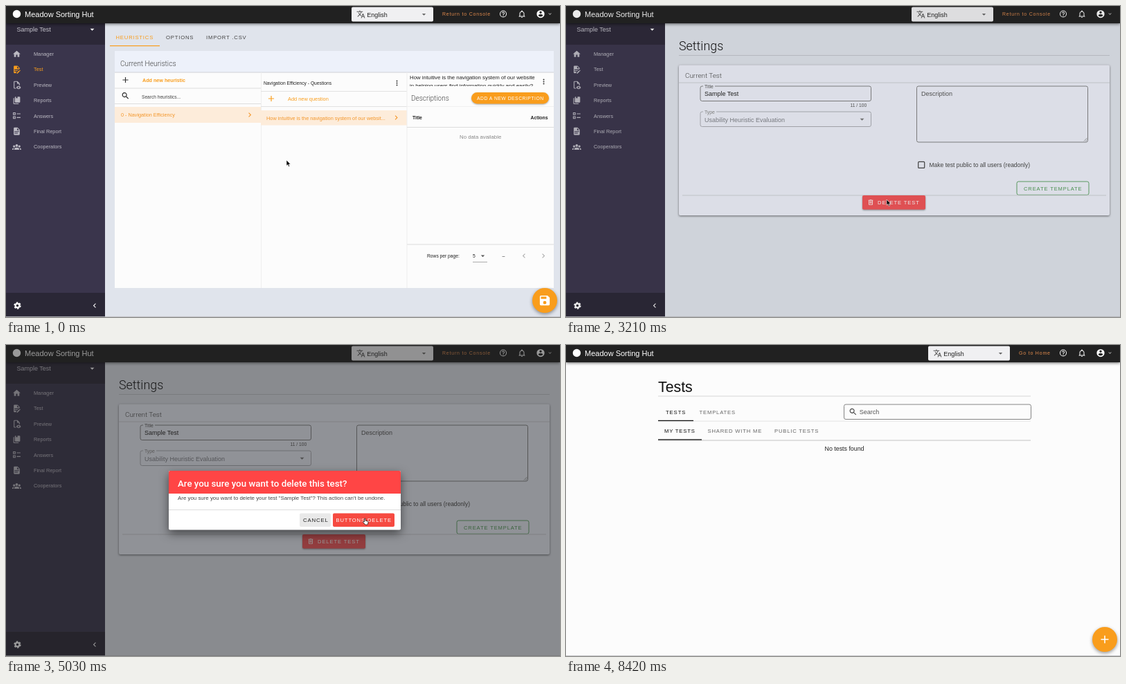
Recreate the animation shown at these times as an HTML page. Size 800 by 450 pixels, loop 8.45 s.

```html
<!DOCTYPE html>
<html lang="en">
<head>
<meta charset="utf-8">
<title>Deleting a test</title>
<style>
html, body { margin: 0; width: 100%; height: 100%; overflow: hidden; }
svg { display: block; width: 100vw; height: 100vh; font-family: "Liberation Sans", Arial, sans-serif; }
text { white-space: pre; }
.rb { font-family: Roboto, sans-serif; }
.card { filter: drop-shadow(0 1px 1.5px #0008); }
.fab { filter: drop-shadow(0 2px 2.5px #0006); }
</style>
</head>
<body>
<svg id="stage" viewBox="0 0 800 450"></svg>
<script>
const ORANGE = '#f99d1c', INK = '#222', LINE = '#cfd2d8';

const icons = {
  home: 'M10 20v-6h4v6h5v-8h3L12 3 2 12h3v8z',
  edit: 'M6 2C4.9 2 4 2.9 4 4V20A2 2 0 0 0 6 22H10V20L12 18H6V16H14L16 14H6V12H18L20 10V8L14 2zM13 3.5L18.5 9H13zM20.2 13L18.7 14.2 20.8 16.3 22 14.8zM18.1 14.8L12 20.9V23H14.1L20.2 16.9z',
  eye: 'M17 18a1 1 0 1 0 0 2 1 1 0 1 0 0-2M17 15C14.3 15 12 16.7 11 19c2 5.3 10 5.3 12 0-1-2.300-3.300-4-6-4M17 16.500a2.500 2.500 0 1 0 0 5 2.500 2.500 0 1 0 0-5M9.300 20H6V4H13V9H18V13L20 13.600V8L14 2H6A2 2 0 0 0 4 4V20A2 2 0 0 0 6 22H10.500z',
  books: 'M19 18H9a2 2 0 0 1-2-2V4a2 2 0 0 1 2-2h1v5l2-1.500L14 7V2h5a2 2 0 0 1 2 2v12a2 2 0 0 1-2 2M17 20v2H5a2 2 0 0 1-2-2V6h2v14z',
  list: 'M2 3h7v7H2zm2 2v3h3V5zM12 5.500h10v2H12zM2 13h7v7H2zm2 2v3h3v-3zM12 15.500h10v2H12z',
  doc: 'M13 9h5.500L13 3.500zM6 2h8l6 6v12a2 2 0 0 1-2 2H6a2 2 0 0 1-2-2V4a2 2 0 0 1 2-2M15 18v-2H6v2zM18 14v-2H6v2z',
  group: 'M12 5.500a3.500 3.500 0 1 1 0 7 3.500 3.500 0 1 1 0-7M5 8a3 3 0 1 0 0 6 3 3 0 1 0 0-6M19 8a3 3 0 1 0 0 6 3 3 0 1 0 0-6M5.500 20v-2c0-5 13-5 13 0v2zM0 20c0-3 1-4 4.500-4.400q-1 1.500-1 4.400zM24 20c0-3-1-4-4.500-4.400q1 1.500 1 4.400z',
  lang: 'M12.900 15L10.300 12.600C12 10.600 13.300 8.400 14 6H17V4H10V2H8V4H1V6H12.200Q11.200 9 9 11.400 7.600 9.800 6.700 8H4.700Q5.800 10.500 7.700 12.600L2.600 17.600 4 19l5-5 3.100 3.100zM18.500 10h-2L12 22h2l1.100-3h4.800L21 22h2zM15.900 17l1.600-4.300L19.100 17z',
  help: 'M11 18h2v-2h-2zM12 2a10 10 0 1 0 0 20 10 10 0 1 0 0-20M12 4a8 8 0 1 1 0 16 8 8 0 1 1 0-16M12 6a4 4 0 0 0-4 4h2a2 2 0 1 1 4 0c0 2-3 1.800-3 5h2c0-2.300 3-2.500 3-5a4 4 0 0 0-4-4',
  bell: 'M10 21h4a2 2 0 0 1-4 0M21 19v1H3v-1l2-2v-6c0-3 2-5.800 5-6.700V4a2 2 0 0 1 4 0v.3c3 .9 5 3.700 5 6.700v6zM17 11a5 5 0 0 0-10 0v7h10z',
  user: 'M12 19.200a7.200 7.200 0 0 1-6-3.200c0-4 12-4 12 0a7.200 7.200 0 0 1-6 3.200M12 5a3 3 0 1 1 0 6 3 3 0 1 1 0-6M12 2a10 10 0 1 0 0 20 10 10 0 1 0 0-20',
  save: 'M15 9H5V5h10M12 19a3 3 0 1 1 0-6 3 3 0 1 1 0 6M17 3H5a2 2 0 0 0-2 2v14a2 2 0 0 0 2 2h14a2 2 0 0 0 2-2V7z',
  search: 'M9.500 3a6.500 6.500 0 0 1 5 10.700l.3.300h.7l5 5-1.500 1.500-5-5v-.8l-.3-.3A6.500 6.500 0 1 1 9.500 3M9.500 5a4.500 4.500 0 1 0 0 9 4.500 4.500 0 1 0 0-9',
  trash: 'M9 3v1H4v2h1v13a2 2 0 0 0 2 2h10a2 2 0 0 0 2-2V6h1V4h-5V3zM7 6h10v13H7zM9 8v9h2V8zM13 8v9h2V8z',
  right: 'M8.600 16.600L13.200 12 8.600 7.400 10 6l6 6-6 6z',
  left: 'M15.400 16.600L10.800 12l4.600-4.600L14 6l-6 6 6 6z',
  down: 'M7.400 8.600L12 13.200l4.600-4.600L18 10l-6 6-6-6z',
  drop: 'M7 10l5 5 5-5z',
  plus: 'M19 13h-6v6h-2v-6H5v-2h6V5h2v6h6z',
  dots: 'M12 4a2 2 0 1 0 0 4 2 2 0 0 0 0-4m0 6a2 2 0 1 0 0 4 2 2 0 0 0 0-4m0 6a2 2 0 1 0 0 4 2 2 0 0 0 0-4'
};

const text = (x, y, size, str, fill = INK, more = '') =>
  `<text x="${x}" y="${y}" font-size="${size}" fill="${fill}" ${more}>${str}</text>`;
const caps = (x, y, str, fill, size = 7.7, gap = .8) => text(x, y, size, str, fill, `letter-spacing="${gap}"`);
const light = (x, y, size, str, fill = '#444') => text(x, y, size, str, fill, 'class="rb" font-weight="300"');
const rect = (x, y, w, h, fill, more = '') =>
  `<rect x="${x}" y="${y}" width="${w}" height="${h}" fill="${fill}" ${more}/>`;
const box = (x, y, w, h, stroke, id = '') =>
  rect(x, y, w, h, 'none', `rx="2.500" stroke="${stroke}" stroke-width=".9" ${id}`);
const rule = (x, y, w, fill = LINE, h = 1) => rect(x, y, w, h, fill);
// icon centred on (x, y)
const icon = (name, x, y, size, fill, more = '') =>
  `<path d="${icons[name]}" fill="${fill}" fill-rule="evenodd" transform="translate(${x - size / 2} ${y - size / 2}) scale(${size / 24})" ${more}/>`;
const group = (id, body, more = '') => `<g id="${id}" ${more}>${body}</g>`;
const fab = name => `<circle class="fab" cx="778" cy="426" r="18" fill="${ORANGE}"/>` + icon(name, 778, 426, 19, '#fff');

const headerRight = (x, label, labelX) =>
  rect(x, 1.5, 118, 21, '#f0f0f2', 'rx="2"') +
  icon('lang', x + 13.5, 12, 13, '#555') + text(x + 22.3, 15.5, 9, 'English') +
  icon('drop', x + 104.5, 12, 13, '#666') + caps(labelX, 14, label, '#e08a4c', 7);

const header = rect(0, 0, 800, 25, '#212121', 'style="filter:drop-shadow(0 1.500px 2px #0009)"') +
  '<circle cx="15.500" cy="11.500" r="5.700" fill="#fff"/>' +
  text(27, 15.5, 11, 'Meadow Sorting Hut', '#fff') +
  icon('help', 718, 11.5, 12, '#fff') + icon('bell', 745, 11.5, 12, '#fff') +
  icon('user', 772, 11.5, 13.5, '#fff') + icon('down', 785.5, 11.5, 8, '#fff') +
  group('toConsole', headerRight(499, 'Return to Console', 630)) +
  group('toHome', headerRight(523, 'Go to Home', 654));

const menu = [['home', 'Manager'], ['edit', 'Test'], ['eye', 'Preview'], ['books', 'Reports'],
  ['list', 'Answers'], ['doc', 'Final Report'], ['group', 'Cooperators']];
const menuItem = ([name, label], i, fill, ink = fill) => {
  const y = 69.5 + i * 22.35;
  return icon(name, 15.5, y, 13, fill) + text(40, y + 2.6, 7.35, label, ink);
};
const sidebar = rect(0, 25, 143, 425, '#3a354c') + rect(0, 25, 143, 31, '#2c2838') +
  rect(0, 415, 143, 35, '#2a2736') +
  text(15.5, 37.3, 9, 'Sample Test', '#c4c2cb') + icon('drop', 124.5, 34, 14, '#fff') +
  menu.map((m, i) => menuItem(m, i, '#bcbac3')).join('') +
  group('active', rect(8, 84, 80, 16, '#3a354c') + menuItem(menu[1], 1, ORANGE)) +
  '<circle id="gearHover" cx="17" cy="433.500" r="9.500" fill="#1d1b24"/>' +
  `<g transform="translate(16.500 433.500) scale(.52)" fill="none" stroke="#fff">
    <circle r="5.500" stroke-width="4"/><circle r="8.500" stroke-width="3" stroke-dasharray="4.900 4"/></g>` +
  icon('left', 128, 433.5, 13, '#fff');

const heuristics =
  caps(158.5, 47.7, 'HEURISTICS', ORANGE) + caps(231, 47.7, 'OPTIONS', '#444') + caps(289, 47.7, 'IMPORT .CSV', '#444') +
  rule(150, 57, 72, ORANGE, 1.2) +
  rect(157, 65, 634, 343, '#fcfcfc', 'class="card" style="filter:drop-shadow(0 .5px .7px #0005)"') +
  rect(157, 65, 634, 31, '#edf1fa') + rule(157, 95.5, 634) + light(165, 86.5, 10.2, 'Current Heuristics') +
  icon('plus', 172.5, 107, 14, '#333') + text(197, 110, 7.2, 'Add new heuristic', ORANGE, 'font-weight="700"') +
  rule(157, 118.5, 211, '#ddd') + icon('search', 172.5, 130, 13, '#222') +
  text(196, 134, 6.6, 'Search heuristics...', '#444') + rule(157, 141, 211, '#ddd') +
  rect(157, 146, 211, 23, '#fdecda') + text(166, 160, 7.27, '0 - Navigation Efficiency', '#f3962a') +
  icon('right', 352, 157.5, 13, '#f3962a') +
  rule(368, 96, 1, '#eee', 312) +
  text(372, 114, 6.7, 'Navigation Efficiency - Questions') + icon('dots', 564.5, 111.5, 12, '#333') +
  rule(368, 123, 211, '#e2e2e2') + icon('plus', 383, 134, 14, ORANGE) +
  text(407, 137, 7.4, 'Add new question', ORANGE) + rule(368, 145, 211, '#e2e2e2') +
  rect(368, 151, 211, 21.5, '#fdecda') +
  text(376, 164.5, 7.35, 'How intuitive is the navigation system of our websit...', '#f3962a') +
  icon('right', 563.5, 161.5, 13, '#f3962a') +
  rule(578.5, 96, 1, '#eee', 312) +
  '<clipPath id="clip"><path d="M579 96h212v20H579z"/></clipPath><g clip-path="url(#clip)">' +
  text(583, 106, 7.82, 'How intuitive is the navigation system of our website') +
  text(583, 117.5, 7.82, 'in helping users find information quickly and easily?') + '</g>' +
  icon('dots', 776.5, 109.5, 12, '#333') +
  light(585, 136.5, 10, 'Descriptions') +
  rect(672, 125, 112, 16.5, ORANGE, 'rx="8.200" style="filter:drop-shadow(0 1px 1px #0005)"') +
  caps(680, 135.7, 'ADD A NEW DESCRIPTION', '#fff', 6.8, .5) +
  rule(579, 145, 212, '#f0f0f0') +
  text(587, 164.3, 6.8, 'Title', INK, 'font-weight="700"') + text(757.5, 164.3, 6.8, 'Actions', INK, 'font-weight="700"') +
  rule(579, 175, 212, '#ddd') + text(655, 192.3, 7.8, 'No data available', '#888') +
  rule(579, 344.5, 212, '#ddd') + text(608, 364, 6.7, 'Rows per page:') + text(674, 364, 6.8, '5') +
  icon('drop', 688.5, 361.5, 13, '#555') + rule(674, 370, 21, '#999', .8) + text(716.5, 364, 7, '–') +
  icon('right', 776, 361.5, 13, '#aaa') + icon('left', 748, 361.5, 13, '#aaa') + fab('save');

const settings =
  text(163, 64.3, 17.9, 'Settings', '#111', 'class="rb" font-weight="350"') + rule(163, 71, 622, '#c3c6cd') +
  '<rect id="card" class="card" x="163" y="85.500" width="622" rx="2" fill="#eef1fa"/>' +
  light(172, 103.7, 9.9, 'Current Test') + rule(163, 110.5, 622) +
  group('form',
    box(194, 116, 246.5, 21.5, '#777') + rect(198, 114, 17, 5, '#eef1fa') +
    text(200, 119, 6.9, 'Title', '#555') + text(200, 130.3, 9, 'Sample Test') +
    text(410.5, 146, 6.7, '11 / 100', '#555') +
    box(194, 153, 246.5, 21.5, '#a5a7ad') + rect(198, 151, 19, 5, '#eef1fa') +
    text(200, 156, 6.9, 'Type', '#888') + text(200, 167.7, 9, 'Usability Heuristic Evaluation', '#808289') +
    icon('drop', 427.5, 164, 14, '#777') +
    box(506.5, 116, 247, 81, '#777') + text(513, 130.3, 9, 'Description', '#555') +
    '<path d="M748 195.500l4.500-4.500M750.500 195.500l2-2" stroke="#777" stroke-width=".7"/>' +
    rect(508.7, 225.4, 9, 9, 'none', 'rx="1" stroke="#444" stroke-width="1.200"') +
    text(524.5, 233, 8.5, 'Make test public to all users (readonly)', '#444')) +
  group('foot',
    `<g id="template">${box(651, 105, 104, 19.3, 'currentColor')}${caps(661, 117.5, 'CREATE TEMPLATE', 'currentColor', 7.6, .85)}</g>` +
    rule(168, 124.5, 612) +
    rect(428, 125, 91, 20.5, '#f25558', 'rx="2" style="filter:drop-shadow(0 1px 1px #0006)"') +
    icon('trash', 440, 135, 10, '#fff') + caps(450, 138, 'DELETE TEST', '#fff', 7.6, .9));

const tests = rect(0, 25, 800, 425, '#fcfcfc') +
  text(133, 67.5, 21.3, 'Tests', '#111') + rule(133, 73.5, 538, '#d8d8d8') +
  caps(144, 99.7, 'TESTS', '#111', 7.7, .9) + caps(192.5, 99.7, 'TEMPLATES', '#666') +
  rule(133, 109.7, 538, '#ddd', .8) + rule(133, 108.8, 51, '#111', 1.3) +
  box(401.5, 86, 270, 21.5, '#777') + icon('search', 414.5, 96.7, 13, '#444') + text(423.7, 100, 9, 'Search', '#555') +
  caps(142, 127, 'MY TESTS', '#111') + caps(204.5, 127, 'SHARED WITH ME', '#666') + caps(301, 127, 'PUBLIC TESTS', '#666') +
  rule(133, 137.5, 538, '#c4c4c4') + rule(133, 136.3, 63, '#111', 1.3) +
  text(373.5, 153, 8.85, 'No tests found') + fab('plus');

const dialog =
  rect(235, 182, 335, 85.5, '#fff', 'rx="2" style="filter:drop-shadow(0 5px 7px #0008)"') +
  '<path d="M235 215v-31q0-2 2-2h331q2 0 2 2v31z" fill="#ff4545"/>' +
  text(248, 204.8, 13.3, 'Are you sure you want to delete this test?', '#fff', 'class="rb" font-weight="500"') +
  text(248, 224, 7.9, 'Are you sure you want to delete your test "Sample Test"? This action can\'t be undone.', '#444') +
  rule(235, 238, 335, '#ddd') +
  rect(424, 243.5, 45, 19.5, '#e9e9e9', 'rx="2"') + caps(429, 256, 'CANCEL', INK, 7.8, .85) +
  rect(472, 243.5, 89, 19.5, '#f4352f', 'rx="2" id="confirm"') + caps(476.5, 256, 'BUTTONS.DELETE', '#fff', 7.6, .9);

const cursor =
  '<path id="arrow" d="M0 0V8.200L1.900 6.500 3.200 9.400 4.600 8.800 3.300 6H5.900z" fill="#000" stroke="#fff" stroke-width=".6"/>' +
  '<path id="hand" d="M1.500 5V.9q0-.9.8-.9t.8.900V3.200l3 .7q1 .3.900 1.300L6.500 8q-.2 1-1 1H3.200q-.8 0-1.200-.8L-.4 5.300Q-.6 4.300.5 4.400z" fill="#fff" stroke="#000" stroke-width=".7"/>';

document.getElementById('stage').innerHTML =
  rect(0, 0, 800, 450, '#e0e4ec') +
  group('heuristics', heuristics) + group('settings', settings) +
  group('sidebar', sidebar) + group('tests', tests) + header +
  rule(0, 449, 800, '#c0c0c4', .8) +
  rect(0, 0, 800, 450, INK, 'id="shade"') + group('dialog', dialog) + group('cursor', cursor);

const el = id => document.getElementById(id);
const show = (id, on) => { el(id).style.display = on ? '' : 'none'; };
const part = (t, from, to) => Math.min(1, Math.max(0, (t - from) / (to - from)));
const easeOut = p => 1 - (1 - p) ** 3;
const smooth = p => p * p * (3 - 2 * p);

const LOOP = 8450, OPEN = 1130, LOADED = 1400, ASK = 3190, DONE = 6180;
// cursor moves: start, end, x, y
const moves = [[30, 1000, 21, 433], [1750, 2850, 463, 280], [3600, 4200, 516, 251], [6900, 7430, 516, -14]];

function draw(t) {
  const loaded = t >= LOADED, done = t >= DONE;
  show('heuristics', t < OPEN);
  show('settings', t >= OPEN && !done);
  show('sidebar', !done);
  show('tests', done);
  show('toConsole', !done);
  show('toHome', done);

  show('form', loaded);
  el('card').setAttribute('height', loaded ? 217.5 : 68.5);
  el('foot').setAttribute('transform', `translate(0 ${loaded ? 149 : 0})`);
  el('template').setAttribute('color', loaded ? '#4f9a55' : '#b0b3b8');
  el('active').setAttribute('opacity', 1 - part(t, 1250, 1500));
  show('gearHover', t > 960 && t < 1880);

  const shade = easeOut(part(t, ASK, ASK + 300)) - easeOut(part(t, DONE, DONE + 300));
  el('shade').setAttribute('opacity', .46 * shade);
  const grow = easeOut(part(t, ASK + 30, ASK + 330)), scale = .5 + grow / 2;
  show('dialog', grow > 0 && !done);
  el('dialog').setAttribute('opacity', grow);
  el('dialog').setAttribute('transform', `translate(402.500 225) scale(${scale}) translate(-402.500 -225)`);
  el('confirm').setAttribute('fill', t > 4100 ? '#f64a41' : '#f4352f');

  let x = 405, y = 223;
  for (const [from, to, nx, ny] of moves) {
    const p = smooth(part(t, from, to));
    x += (nx - x) * p;
    y += (ny - y) * p;
  }
  el('cursor').setAttribute('transform', `translate(${x} ${y})`);
  const hand = t > 960 && t < 1880 || t > 2700 && t < ASK || t > 4060 && !done;
  show('hand', hand);
  show('arrow', !hand);
}

const start = performance.now();
function tick() {
  draw((performance.now() - start) % LOOP);
  requestAnimationFrame(tick);
}
tick();
</script>
</body>
</html>
```
